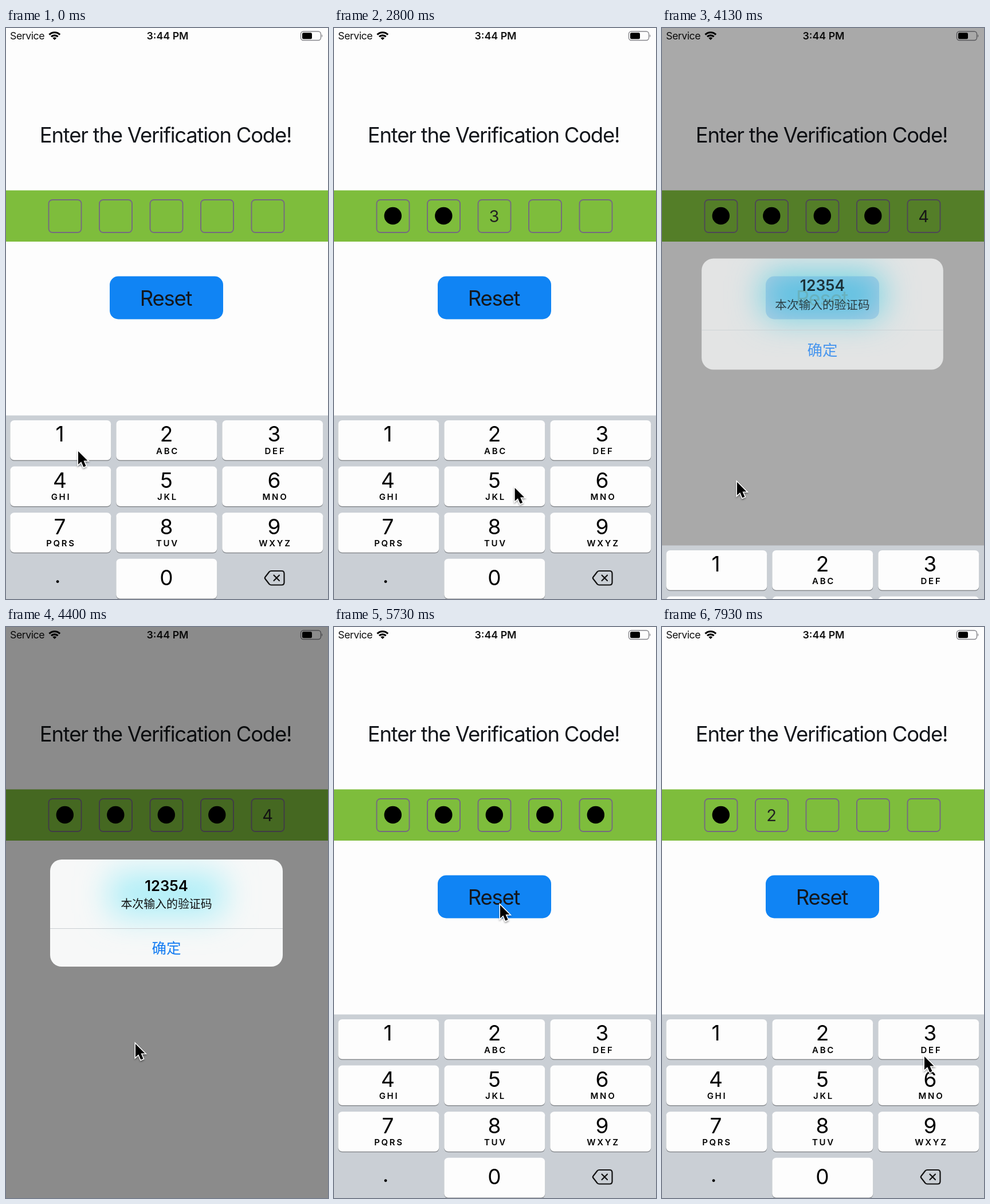
Write an HTML page that moves like this. It is 562 px wide and 997 px high and loops after 8000 ms.

```html
<!DOCTYPE html>
<html lang="en">
<head>
<meta charset="utf-8">
<title>Verification code</title>
<style>
  html, body { margin: 0; width: 100%; height: 100%; overflow: hidden; background: #fdfdfd; }
  svg { display: block; width: 100vw; height: 100vh; }
  text { font-family: Inter, "Noto Sans CJK SC", "Noto Sans CJK", sans-serif; font-optical-sizing: none; fill: #111; }
  .mid { text-anchor: middle; }
  .big { font-size: 36.5px; letter-spacing: -.034em; fill: #14171c; }
  .status { font-size: 17.8px; }
  .digit { font-size: 37px; fill: #000; }
  .letters { font-size: 15px; font-weight: 600; letter-spacing: 2.7px; fill: #000; }
  .code { font-size: 29px; fill: #222; }
  #glow { mix-blend-mode: multiply; }
</style>
</head>
<body>
<svg viewBox="0 0 562 997" preserveAspectRatio="none">
  <defs>
    <clipPath id="panelClip"><rect x="77" y="406" width="406" height="187" rx="20"/></clipPath>
    <filter id="blur" x="-60%" y="-140%" width="220%" height="380%" color-interpolation-filters="sRGB">
      <feGaussianBlur stdDeviation="28"/>
    </filter>
    <filter id="soft" x="-50%" y="-50%" width="200%" height="200%">
      <feDropShadow dx="0" dy="2" stdDeviation="1.5" flood-opacity=".4"/>
    </filter>
  </defs>
  <rect width="562" height="997" fill="#fdfdfd"/>

  <text class="status" x="7" y="20" letter-spacing="-.5">Service</text>
  <g fill="none" stroke="#000" stroke-width="3.2">
    <path d="M75.5 11.6A13.2 13.2 0 0 1 94.1 11.6M79 15.2A8.2 8.2 0 0 1 90.6 15.2"/>
    <path d="M84.8 21L81.4 17.6A4.8 4.8 0 0 1 88.2 17.6Z" fill="#000" stroke="none"/>
  </g>
  <text class="status mid" x="282" y="20" font-weight="600">3:44 PM</text>
  <rect x="514.5" y="6" width="35" height="15.5" rx="4.5" fill="none" stroke="#85858a" stroke-width="1.4"/>
  <rect x="517" y="8.3" width="17" height="11" rx="2.2"/>
  <path d="M551 11Q553.6 13.7 551 16.5Z" fill="#85858a"/>

  <text class="big mid" x="278.5" y="200">Enter the Verification Code!</text>
  <rect y="283.5" width="562" height="89.5" fill="#7ebd3c"/>
  <g id="slots"></g>
  <rect x="181" y="433.5" width="198" height="75" rx="15" fill="#1084f4"/>
  <text class="big mid" x="279" y="485">Reset</text>

  <rect id="dim" width="562" height="997"/>
  <g id="panel">
    <rect x="77" y="406" width="406" height="187" rx="20" fill="#f7f8f8"/>
  </g>
  <g id="glow" clip-path="url(#panelClip)">
    <rect x="181" y="430" width="198" height="75" rx="15" fill="#3ce6ff" filter="url(#blur)"/>
  </g>
  <g id="message">
    <path d="M77 526.5H483" stroke="#c9ced2" stroke-width="1"/>
    <text class="mid" x="280" y="460.5" font-size="25.5" font-weight="600" style="fill:#000">12354</text>
    <text class="mid" x="280" y="491" font-size="19.9">本次输入的验证码</text>
    <text class="mid" x="280" y="569.5" font-size="25.5" style="fill:#147cf2">确定</text>
  </g>
  <g id="keyboard"><rect y="676.5" width="562" height="322" fill="#cacfd5"/></g>
  <g id="cursor" filter="url(#soft)">
    <path d="M0 0V23L5.3 18.2 9.3 27.5 13.5 25.7 9.5 16.6H16.5Z" fill="#000" stroke="#fff" stroke-width="3" paint-order="stroke"/>
  </g>
</svg>
<script>
const LOOP = 8000, MASK_DELAY = 600, HOLD = 110;
const $ = id => document.getElementById(id);

function add(parent, tag, attrs, text) {
  const el = document.createElementNS(parent.namespaceURI, tag);
  for (const name in attrs) el.setAttribute(name, attrs[name]);
  if (text) el.textContent = text;
  return parent.appendChild(el);
}

// Keypad
const keyboard = $('keyboard'), keys = {};
const textX = [94, 280, 468];
const letters = ['', 'ABC', 'DEF', 'GHI', 'JKL', 'MNO', 'PQRS', 'TUV', 'WXYZ'];

function addKey(digit, col, row, label) {
  const x = 7.3 + col * 185, y = 685 + row * 80.6;
  add(keyboard, 'rect', { x, y: y + 1.5, width: 176, height: 69.5, rx: 7, fill: '#898c90' });
  keys[digit] = add(keyboard, 'rect', { x, y, width: 176, height: 69.5, rx: 7 });
  add(keyboard, 'text', { class: 'digit mid', x: textX[col], y: y + (row < 3 ? 37.3 : 46.5) }, digit);
  add(keyboard, 'text', { class: 'letters mid', x: textX[col] + 2, y: y + 58.8 }, label);
}
letters.forEach((label, i) => addKey(String(i + 1), i % 3, Math.floor(i / 3), label));
addKey('0', 1, 3, '');
add(keyboard, 'text', { class: 'digit mid', x: 90, y: 968.5 }, '.');
add(keyboard, 'path', {
  d: 'M463 948H481Q485.5 948 485.5 952.5V968Q485.5 972.5 481 972.5H463Q461 972.5 459.5 971L452.5 962Q451 960.2 452.5 958.5L459.5 949.5Q461 948 463 948ZM467.5 955.5L477 965M477 955.5L467.5 965',
  fill: 'none', stroke: '#111', 'stroke-width': 2.2, 'stroke-linejoin': 'round', 'stroke-linecap': 'round'
});

// Code boxes
const slots = [0, 1, 2, 3, 4].map(i => {
  const x = 74.5 + i * 88.5, g = $('slots');
  add(g, 'rect', { x, y: 300, width: 57, height: 57, rx: 6.5, fill: 'none', stroke: '#756b80', 'stroke-width': 1.9 });
  return {
    dot: add(g, 'circle', { cx: x + 28.3, cy: 328, r: 15.2 }),
    digit: add(g, 'text', { class: 'code mid', x: x + 28, y: 338.7 })
  };
});

// Timeline
const CLEAR = 6050, ALERT_IN = 4000, ALERT_OUT = 5167;
const taps = [['1', 620], ['2', 1450], ['3', 2300], ['5', 3120], ['4', 3990], ['1', 7180], ['2', 7600]]
  .map(([key, at]) => ({ key, at }));
const path = [
  [0, 126, 739], [720, 126, 739], [1150, 303, 741], [1670, 306, 745], [1770, 306, 745],
  [2120, 476, 744], [2420, 476, 744], [2880, 302, 808], [3220, 302, 808], [3650, 116, 803],
  [4050, 116, 803], [4400, 226, 728], [4850, 294, 563], [5310, 294, 563], [5750, 290, 485],
  [6150, 290, 485], [6650, 276, 813], [6800, 276, 813], [7060, 130, 739], [7230, 130, 739],
  [7480, 304, 742], [7660, 304, 742], [7930, 458, 750], [8000, 462, 748]
];

const easeOut = u => 1 - (1 - Math.min(1, Math.max(0, u))) ** 3;
const smooth = u => u * u * (3 - 2 * u);

// 1 while fully present, 0 while absent
const presence = (t, inTime, outTime) =>
  t < ALERT_OUT ? easeOut((t - ALERT_IN) / inTime) : 1 - easeOut((t - ALERT_OUT) / outTime);

function cursorAt(t) {
  const i = path.findIndex(p => p[0] > t);
  const [t0, x0, y0] = path[i - 1], [t1, x1, y1] = path[i];
  const u = smooth((t - t0) / (t1 - t0));
  return [x0 + (x1 - x0) * u, y0 + (y1 - y0) * u];
}

function draw(t) {
  const since = t < CLEAR ? 0 : CLEAR;
  const typed = taps.filter(tap => tap.at >= since && tap.at <= t);
  slots.forEach(({ dot, digit }, i) => {
    const tap = typed[i];
    const plain = tap && i === typed.length - 1 && t < tap.at + MASK_DELAY;
    dot.style.display = tap && !plain ? '' : 'none';
    digit.textContent = plain ? tap.key : '';
  });

  for (const key in keys) {
    const down = taps.some(tap => tap.key === key && t >= tap.at - HOLD && t < tap.at);
    keys[key].setAttribute('fill', down ? '#abb8c8' : '#fdfdfd');
  }

  const shown = presence(t, 360, 420);
  $('dim').style.opacity = .45 * presence(t, 360, 360);
  $('panel').style.opacity = $('message').style.opacity = shown;
  $('glow').style.opacity = .4 * shown + 2.1 * shown * (1 - shown);
  const scale = t < ALERT_OUT ? 1.15 - .15 * shown : 1;
  for (const id of ['panel', 'glow', 'message'])
    $(id).setAttribute('transform', `translate(280 499.5) scale(${scale}) translate(-280 -499.5)`);

  keyboard.setAttribute('transform', `translate(0 ${321 * presence(t, 390, 450)})`);
  $('cursor').setAttribute('transform', `translate(${cursorAt(t)})`);
}

const start = performance.now();
function tick() {
  draw((performance.now() - start) % LOOP);
  requestAnimationFrame(tick);
}
tick();
</script>
</body>
</html>
```
